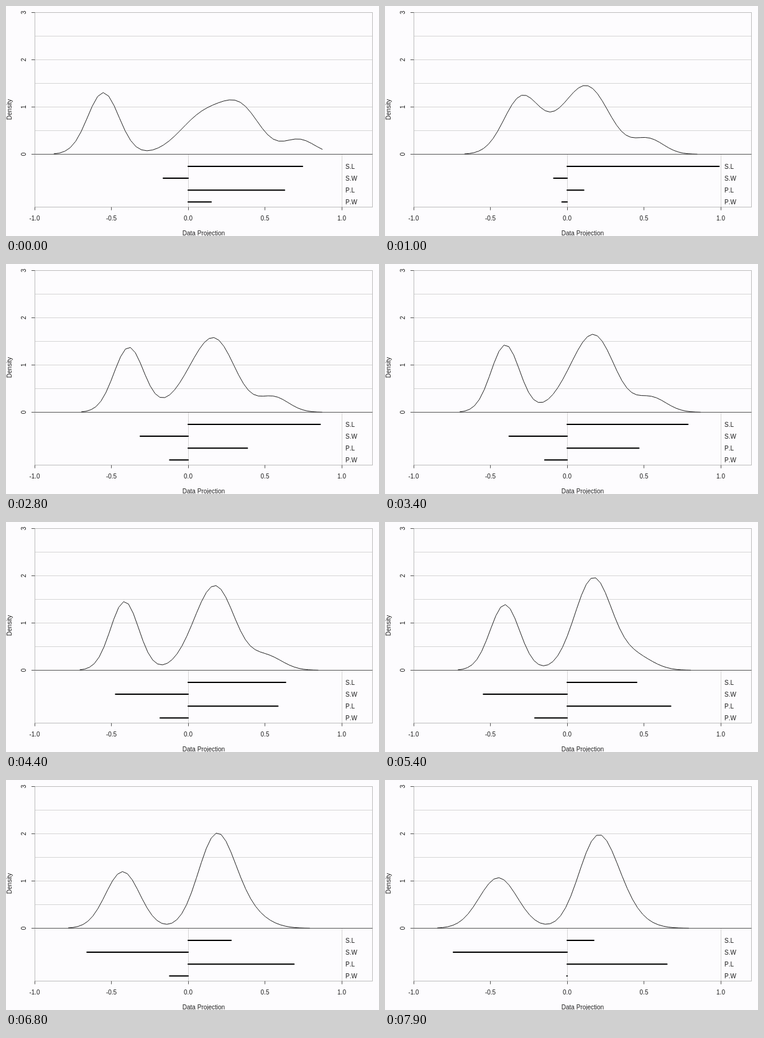
Write an HTML page that moves like this. It is 600 px wide and 370 px high and loops after 8 s.

```html
<!DOCTYPE html>
<html lang="en">
<head>
<meta charset="utf-8">
<title>Data Projection</title>
<style>
  html, body { margin: 0; width: 100%; height: 100%; overflow: hidden; background: #fdfcfe; }
  svg { display: block; }
  text { font: 10px Arial, "Liberation Sans", sans-serif; font-kerning: none; fill: #1c1c1c; }
  .grid { stroke: #d6d6d6; }
  .frame { stroke: #bebebe; fill: none; }
  .tick { stroke: #555; }
  .zero { stroke: #555; }
  .bar { stroke: #000; stroke-width: 2; stroke-linecap: round; }
  .curve { stroke: #222; fill: none; stroke-linejoin: round; }
</style>
</head>
<body>
<svg id="plot" width="600" height="370" viewBox="0 0 600 370"></svg>
<script>
const LOOP = 8000, RESTART = 100, STEP = 100;
const LEFT = 46.5, RIGHT = 589.5, TOP = 10.5, BOTTOM = 323.5, ZERO = 238.5;
const px = v => 293 + 247 * v;
const py = d => ZERO - 76 * d;

// Iris measurements in cm, each class a normal cloud: S.L, S.W, P.L, P.W
const NAMES = ["S.L", "S.W", "P.L", "P.W"];
const RANGE = [3.6, 2.4, 5.9, 2.4];
const CLOUDS = [
  { n: 50, mean: [5.01, 3.43, 1.46, .25], sd: [.35, .38, .17, .11], corr: .6 },
  { n: 50, mean: [5.94, 2.77, 4.26, 1.33], sd: [.52, .31, .47, .2], corr: .4 },
  { n: 38, mean: [6.31, 2.93, 5.32, 2.02], sd: [.39, .31, .36, .27], corr: .25 },
  { n: 12, mean: [7.48, 3.13, 6.3, 2.05], sd: [.27, .37, .33, .25], corr: .3 }
];
const SCALE = 1.1, KERNEL = .06, LIMIT = .875, SAMPLES = 50;

// The tour turns the projection at constant speed from one pose to the next
const OLD_POSE = [.745, -.162, .628, .15];
const TOUR = [
  { t: 340, pose: [1, 0, 0, 0] },
  { t: 5850, pose: [.364, -.57, .705, -.22] },
  { t: 7900, pose: [.174, -.741, .65, -.002] }
];
const PAUSES = [1000, 1400, 2300, 3100, 3700, 4900, 5400, 5800, 6800, 7600];
const PAUSE = 300;

const sum = list => list.reduce((a, b) => a + b, 0);
const dot = (a, b) => sum(a.map((x, i) => x * b[i]));

const total = sum(CLOUDS.map(c => c.n));
const center = RANGE.map((_, i) => sum(CLOUDS.map(c => c.n * c.mean[i])) / total);

function shownTime(now) {
  const pause = PAUSES.find(p => now >= p && now < p + PAUSE);
  return pause ?? Math.floor(now / STEP) * STEP;
}

function turn(a, b, k) {
  const angle = Math.acos(dot(a, b) / Math.hypot(...a) / Math.hypot(...b));
  const wa = Math.sin((1 - k) * angle) / Math.sin(angle);
  const wb = Math.sin(k * angle) / Math.sin(angle);
  return a.map((x, i) => wa * x + wb * b[i]);
}

function poseAt(t) {
  if (t < RESTART) return OLD_POSE;
  const i = t < TOUR[1].t ? 0 : 1;
  const from = TOUR[i], to = TOUR[i + 1];
  const k = (t - from.t) / (to.t - from.t);
  return turn(from.pose, to.pose, Math.min(1, Math.max(0, k)));
}

// Mean, spread and weight of each cloud seen along the pose
function project(pose) {
  return CLOUDS.map(c => {
    const spread = pose.map((w, i) => SCALE * w * c.sd[i] / RANGE[i]);
    const variance = (1 - c.corr) * dot(spread, spread) + c.corr * sum(spread) ** 2;
    return {
      weight: c.n / total,
      mean: SCALE * sum(pose.map((w, i) => w * (c.mean[i] - center[i]) / RANGE[i])),
      sd: Math.hypot(Math.sqrt(variance), KERNEL)
    };
  });
}

function curvePoints(pose) {
  const bells = project(pose);
  const from = Math.max(-LIMIT, Math.min(...bells.map(b => b.mean - 3.2 * b.sd)));
  const to = Math.min(LIMIT, Math.max(...bells.map(b => b.mean + 3.2 * b.sd)));
  const density = x => sum(bells.map(b =>
    b.weight * Math.exp(-(((x - b.mean) / b.sd) ** 2) / 2) / (b.sd * Math.sqrt(2 * Math.PI))));
  return Array.from({ length: SAMPLES }, (_, i) => {
    const x = from + (to - from) * i / (SAMPLES - 1);
    return px(x).toFixed(2) + "," + py(density(x)).toFixed(2);
  }).join(" ");
}

const svg = document.getElementById("plot");
function add(tag, attrs, text) {
  const el = document.createElementNS("http://www.w3.org/2000/svg", tag);
  for (const k in attrs) el.setAttribute(k, attrs[k]);
  if (text) el.textContent = text;
  return svg.appendChild(el);
}
const line = (cls, x1, y1, x2, y2) => add("line", { class: cls, x1, y1, x2, y2 });
const label = (x, y, text, anchor = "middle") => add("text", { x, y, "text-anchor": anchor }, text);
const upright = (x, y, text) =>
  add("text", { transform: `translate(${x} ${y}) rotate(-90)`, "text-anchor": "middle" }, text);

for (let d = .5; d < 3; d += .5) line("grid", LEFT, py(d), RIGHT, py(d));
for (const v of [0, 1]) line("grid", px(v) + .5, ZERO, px(v) + .5, BOTTOM);
add("rect", { class: "frame", x: LEFT, y: TOP, width: RIGHT - LEFT, height: BOTTOM - TOP });
line("zero", LEFT, ZERO, RIGHT, ZERO);
for (let d = 0; d <= 3; d++) {
  line("tick", 41, py(d), LEFT, py(d));
  upright(32, py(d), String(d));
}
for (let v = -1; v <= 1; v += .5) {
  const x = Math.floor(px(v)) + .5;
  line("tick", x, BOTTOM, x, 328.5);
  label(px(v), 345, v.toFixed(1));
}
upright(9, 166.5, "Density");
label(318, 368.5, "Data Projection");

const curve = add("polyline", { class: "curve" });
const bars = NAMES.map((name, i) => {
  const y = 258 + 19.1 * i;
  label(546, y + 4, name, "start");
  return line("bar", px(0), y, px(0), y);
});

function draw(t) {
  const pose = poseAt(t);
  bars.forEach((bar, i) => bar.setAttribute("x2", px(pose[i]) - .01));
  curve.setAttribute("points", curvePoints(pose));
}

let shown = -1;
function tick() {
  const t = shownTime(performance.now() % LOOP);
  if (t !== shown) draw(shown = t);
  requestAnimationFrame(tick);
}
tick();
</script>
</body>
</html>
```
